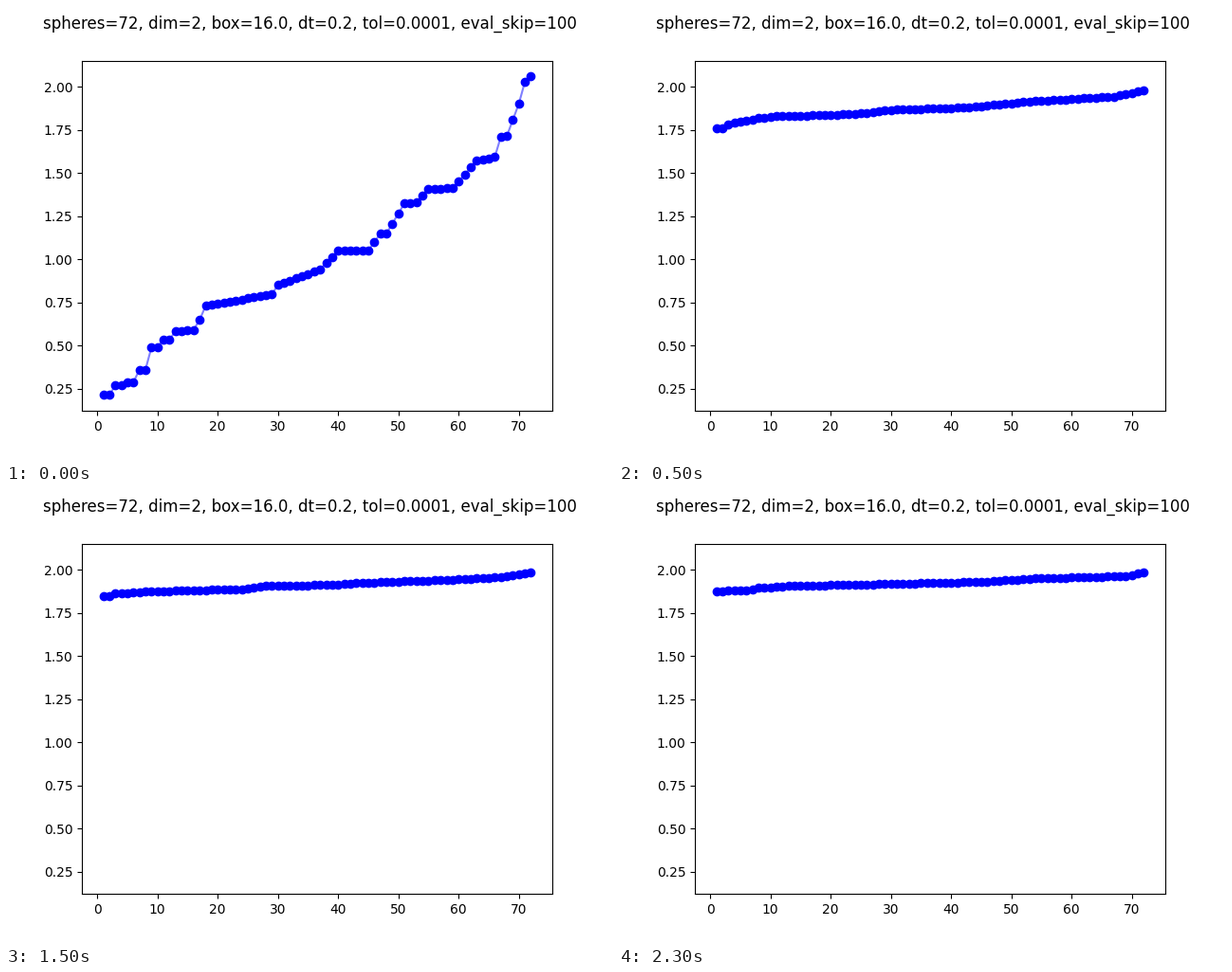
These frames come from a looping animation (640 by 480 pixels, 2.5 s). A matplotlib script:

```python
import matplotlib.pyplot as plt
import numpy as np
from matplotlib.animation import FuncAnimation

INDEX = np.arange(1, 73)


def curve(*keys, paired=2):
    """Line through (index, value) keys; the first `paired` dots share values in twos."""
    first_of_pair = INDEX - (INDEX + 1) % 2
    x = np.where(INDEX <= paired, first_of_pair, INDEX)
    return np.interp(x, *zip(*keys))


STEPS = [
    # random start: uneven climb with a few plateaus
    curve((1, .214), (3, .269), (5, .288), (7, .36), (9, .49), (13, .583),
          (16, .597), (17, .649), (18, .731), (29, .798), (30, .852),
          (37, .942), (40, 1.051), (45, 1.051), (47, 1.149), (48, 1.149),
          (51, 1.324), (53, 1.33), (55, 1.407), (59, 1.412), (63, 1.572),
          (66, 1.593), (67, 1.709), (68, 1.714), (70, 1.902), (71, 2.028),
          (72, 2.059), paired=16),
    # relaxed states: nearly level
    curve((1, 1.758), (3, 1.783), (8, 1.818), (11, 1.828), (24, 1.841),
          (30, 1.866), (43, 1.88), (53, 1.915), (67, 1.942), (72, 1.978)),
    curve((1, 1.829), (4, 1.845), (10, 1.853), (20, 1.883), (52, 1.919),
          (65, 1.943), (69, 1.965), (71, 1.968), (72, 1.983)),
    curve((1, 1.847), (3, 1.861), (8, 1.873), (25, 1.889), (28, 1.905),
          (40, 1.913), (43, 1.922), (60, 1.944), (67, 1.957), (72, 1.983)),
    curve((1, 1.877), (6, 1.879), (8, 1.894), (13, 1.906), (31, 1.918),
          (45, 1.93), (54, 1.949), (69, 1.963), (72, 1.983)),
]

fig, ax = plt.subplots(figsize=(6.4, 4.8), dpi=100)
fig.suptitle("spheres=72, dim=2, box=16.0, dt=0.2, tol=0.0001, eval_skip=100")
dots, = ax.plot(INDEX, STEPS[0], "bo")
line, = ax.plot(INDEX, STEPS[0], "b-", alpha=0.5)
# keep the limits of the first step
ax.set_xlim(ax.get_xlim())
ax.set_ylim(ax.get_ylim())


def update(step):
    for artist in (dots, line):
        artist.set_ydata(STEPS[step])
    return dots, line


anim = FuncAnimation(fig, update, frames=len(STEPS), interval=500, repeat=True)
plt.show()
```
